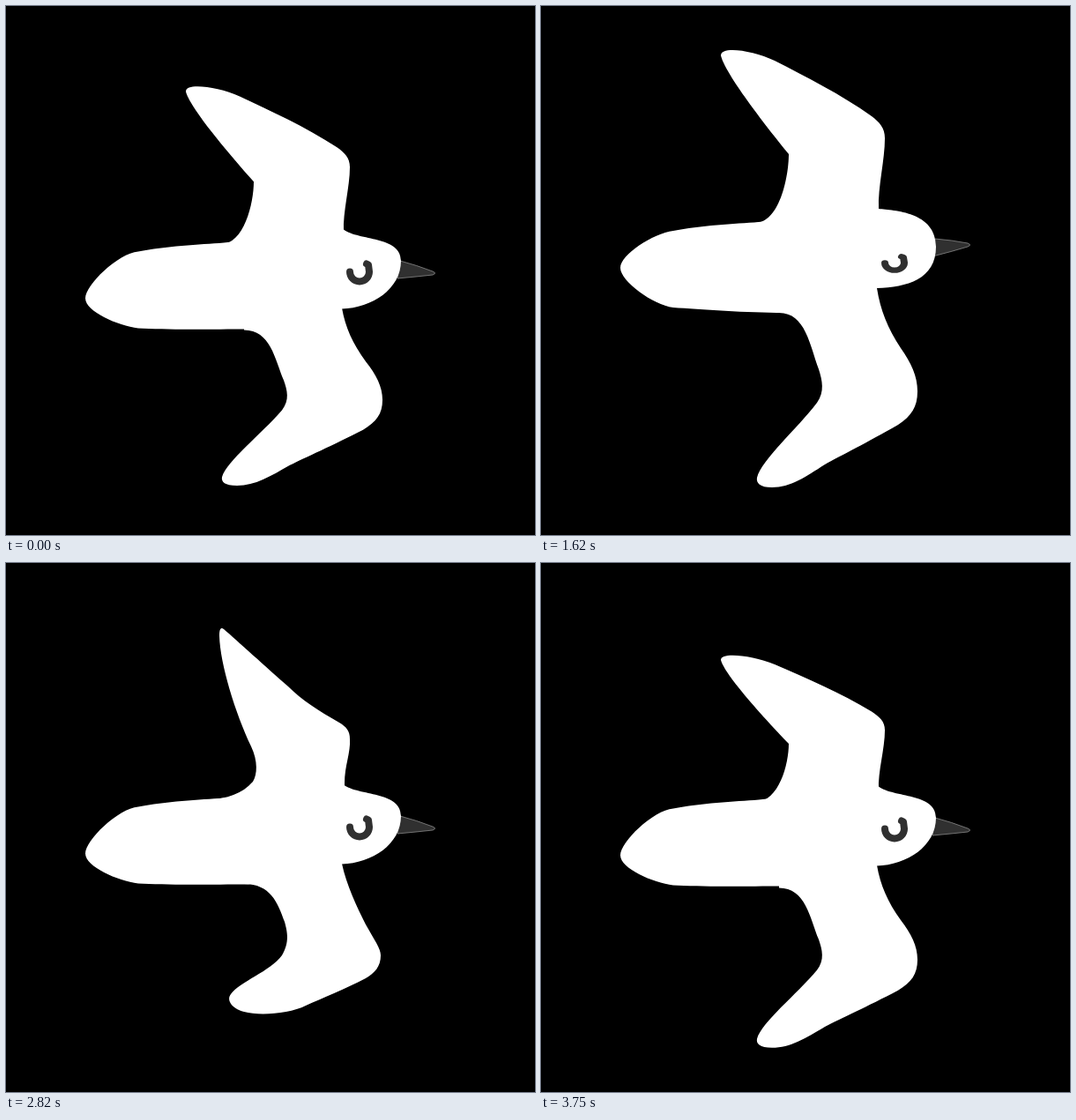
Recreate the animation shown at these times as an HTML page with a canvas. Size 600 by 600 pixels, loop 3.78 s.

```html
<!DOCTYPE html>
<html>
<head>
<meta charset="utf-8">
<style>
html, body { margin: 0; width: 100%; height: 100%; overflow: hidden; background: #000; }
canvas { display: block; }
</style>
</head>
<body>
<canvas id="stage" width="600" height="600"></canvas>
<script>
const ctx = document.getElementById('stage').getContext('2d');
const LOOP = 3780, STEP = 30, DARK = '#303030';
const SWEEP_START = 2805, SWEEP_END = 3405;

// Each wing stretches vertically about its pivot height.
const wing = (pivot, d) => ({ pivot, path: new Path2D(d) });
const spread = {
  top: wing(256, `M383 230C382 205 390 175 390 150C390 138 384 132 375 125
    C340 100 300 80 265 62C240 50 204 45 204 56C206 66 222 95 281 168
    C281 195 270 246 243 246L245 270L383 270Z`),
  bottom: wing(311, `M381 320C385 345 393 365 408 388C420 405 427 420 427 437
    C427 455 420 465 405 475C370 495 340 510 322 520C300 534 283 546 262 546
    C248 546 244 541 245 535C250 515 290 480 313 450C322 437 319 425 315 412
    C305 385 300 348 270 348L270 300L381 300Z`)
};
const swept = {
  top: wing(277.5, `M384 250C384 230 391 215 390 200C390 190 386 186 378 181
    C355 168 335 155 320 140C295 118 262 88 247 75C243 72 242 76 242 83
    C243 115 260 170 278 208C286 225 285 240 280 248C268 262 250 267 230 269
    L230 290L384 290Z`),
  bottom: wing(332.5, `M381 341C386 365 398 390 408 410C418 428 425 437 425 445
    C425 458 418 465 408 471C385 483 358 494 340 502C322 511 288 514 270 509
    C255 505 250 495 255 489C265 475 300 463 313 445C322 430 319 418 316 407
    C308 385 300 364 270 364L270 320L381 320Z`)
};
const eye = new Path2D('M390 -1A11 11 0 0 0 412 -1L411 -9L409 -10');

// Eases through [time, value] key points and holds the last one.
function track(t, ...keys) {
  const i = keys.findIndex(k => k[0] > t);
  if (i < 0) return keys.at(-1)[1];
  const [t0, a] = keys[i - 1], [t1, b] = keys[i];
  return a + (b - a) * (1 - Math.cos(Math.PI * (t - t0) / (t1 - t0))) / 2;
}

function drawWing({ pivot, path }, y, stretch) {
  ctx.save();
  ctx.translate(0, y);
  ctx.scale(1, stretch);
  ctx.translate(0, -pivot);
  ctx.fill(path);
  ctx.restore();
}

function bodyPath(droop, nod) {
  const tail = 22 + 11 * droop, belly = 73 - 3 * droop - 2 * nod;
  return new Path2D(`M90 ${tail}
    C90 ${tail - 15} 127 ${-17 + 6.5 * droop - 7.5 * nod} 150 -20
    C180 -26 220 -28 247 -30 L383 -45
    C400 ${-43 + 11 * nod} 448 ${-42 + 4 * droop} 448 ${-2 + 1.5 * droop - 9 * nod}
    C448 ${35 - 3.5 * droop - 9 * nod} 415 44 381 45 L275 ${belly}
    C235 ${belly} 180 69 150 67
    C127 64 90 ${tail + 15} 90 ${tail}Z`);
}

function beakPath(droop, nod) {
  const top = -11 + 1.5 * droop, tip = -4 + 5.5 * droop + 3 * nod, base = 9 + 1.5 * droop;
  return new Path2D(`M447 ${top}
    Q466 ${(top + tip) / 2 - 2} 484 ${tip - 2}
    Q489 ${tip} 484 ${tip + 2}
    Q466 ${(base + tip) / 2 + 1} 444 ${base}Z`);
}

function draw(t) {
  const centre = track(t, [0, 298.5], [1050, 310], [1620, 275], [1750, 258], [2140, 305],
    [2400, 289.5], [2590, 263], [2820, 296.5], [3360, 292], [3500, 305], [3750, 298.5]);
  const fold = track(t, [0, 0.087], [800, 0.42], [1620, 0], [3400, 0], [3750, 0.087]);
  const roll = 0.24 * Math.max(0, Math.sin(Math.PI * Math.max(0, t - 2820) / 1020));
  const droop = track(t, [0, 1], [1050, 2], [1620, 0], [2790, 0], [2820, 1]);
  const nod = track(t, [0, 1], [1050, 0], [2790, 0], [2820, 1]);
  const wings = t > SWEEP_START && t < SWEEP_END ? swept : spread;

  ctx.fillStyle = '#000';
  ctx.fillRect(0, 0, 600, 600);
  ctx.save();
  ctx.translate(0, centre);

  ctx.fillStyle = '#fff';
  drawWing(wings.top, -19, 1 - fold - roll);
  drawWing(wings.bottom, 36, 1 - 1.25 * fold + 0.38 * roll);

  const beak = beakPath(droop, nod);
  ctx.fillStyle = DARK;
  ctx.fill(beak);
  ctx.strokeStyle = '#999';
  ctx.lineWidth = 0.7;
  ctx.stroke(beak);
  ctx.fillStyle = '#fff';
  ctx.fill(bodyPath(droop, nod));

  ctx.translate(0, 17 - 13 * droop);
  ctx.scale(1, 0.77 + 0.23 * nod);
  ctx.strokeStyle = DARK;
  ctx.lineWidth = 8;
  ctx.lineCap = ctx.lineJoin = 'round';
  ctx.stroke(eye);
  ctx.restore();
}

const start = performance.now();
function tick() {
  const t = (performance.now() - start) % LOOP;
  draw(Math.floor(t / STEP) * STEP);
  requestAnimationFrame(tick);
}
tick();
</script>
</body>
</html>
```
